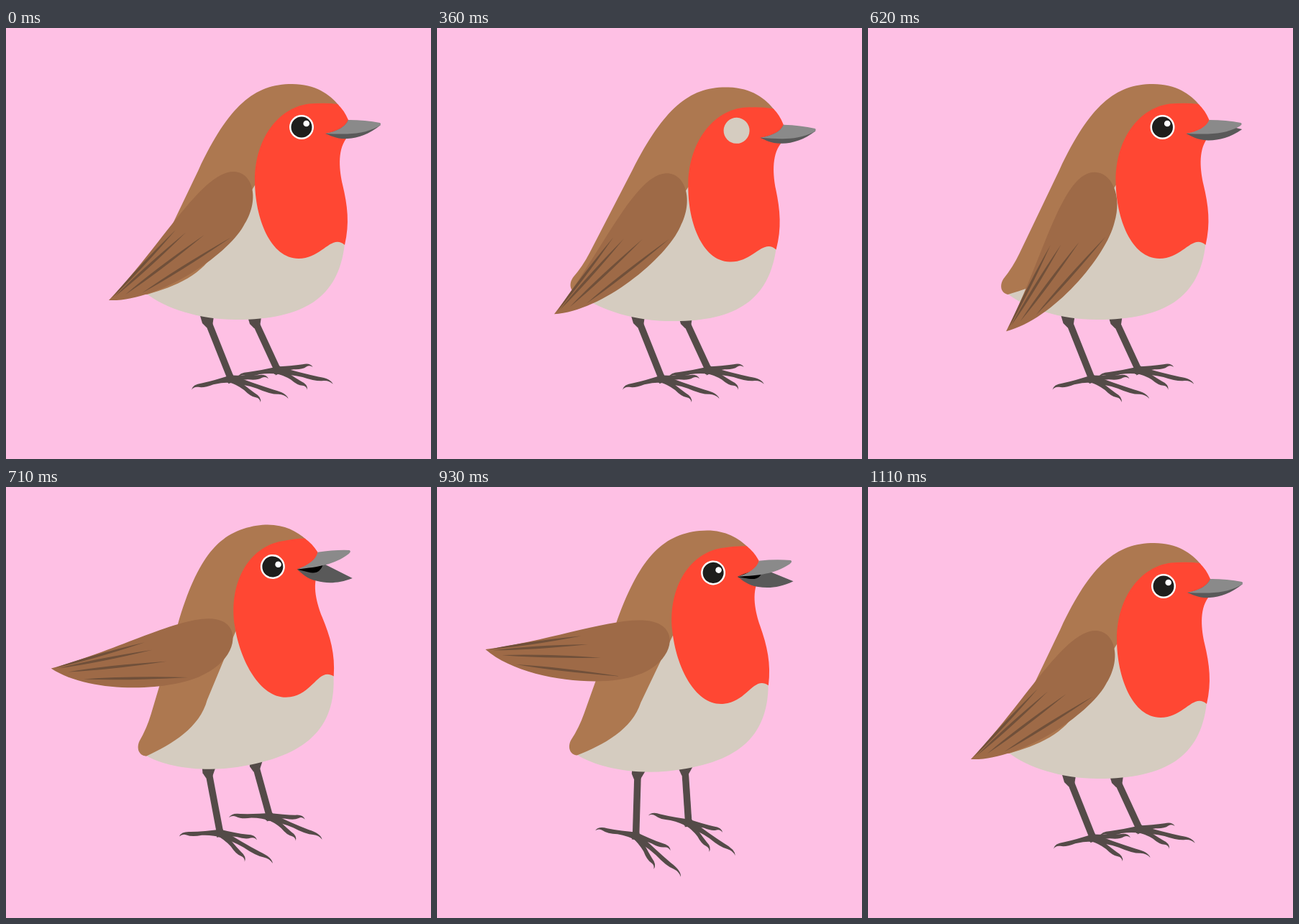
An HTML page with a canvas for the animation above (1.17 s loop, 591 by 600 pixels).

```html
<!DOCTYPE html>
<html lang="en">
<head>
<meta charset="utf-8">
<title>Hopping robin</title>
<style>
html, body { margin: 0; width: 100%; height: 100%; overflow: hidden; background: #fec0e4; }
canvas { display: block; }
</style>
</head>
<body>
<canvas id="stage" width="591" height="600"></canvas>
<script>
const ctx = document.getElementById('stage').getContext('2d');
const LOOP = 1170;
const COLOR = {
  sky: '#fec0e4', back: '#ad7850', wing: '#9e6a47', streak: '#70503a',
  belly: '#d5ccc0', red: '#ff4733', beak: '#8a8a8a', jaw: '#595959',
  leg: '#544b48', pupil: '#1e1e1c'
};

// The picture steps every 30 ms, apart from a few holds
const HOLD = { 0: 200, 260: 100, 420: 170, 770: 100, 1110: 60 };
const TICKS = [];
for (let t = 0; t < LOOP; t += HOLD[t] || 30) TICKS.push(t);

const rest = { turn: 0, x: 0, y: 0, flap: 0, jaw: 0, look: 0, swing: 0 };
const dip = { ...rest, turn: 2.6, flap: -11.5 };
const ready = { ...rest, x: -1.5, flap: -16.3, jaw: 4.5 };
const launch = { turn: -9, x: -9, y: -5, flap: 40, jaw: 27, look: 24, swing: 20 };
const apex = { ...launch, y: -37, flap: 98.5, jaw: 39.5, look: 48, swing: 42 };
const KEYS = [
  [0, rest], [180, rest], [450, dip], [620, ready], [710, launch], [770, apex],
  [870, { ...apex, y: -24 }], [900, { ...launch, flap: 75, swing: 44 }],
  [990, ready], [1050, dip], [1110, rest], [LOOP, rest]
];

const belly = new Path2D(`M471 300 C463 375 415 406 320 406
  C270 406 220 390 196 370 L346 200 400 250Z`);
const back = new Path2D(`M196 371 C186 369 184 358 190 349 Q203 333 212 314
  L268 197 C310 108 345 78 398 78 C430 78 450 92 463 108
  L400 170 346 219 292 307 C276 343 235 360 196 371Z`);
const face = new Path2D(`M461 106 Q470 114 476 128 L473 154
  C460 172 464 200 468 218 C475 247 478 272 471 302
  C452 286 440 321 407 321 C368 321 346 265 346 212
  C346 152 382 105 430 105 Q448 104 461 106Z`);
const beak = new Path2D(`M444 147 C460 144 472 138 476 128 Q500 128 520 132
  Q523 134 518 137 C495 149 475 148 444 147Z`);
const jaw = new Path2D(`M444 147 C460 144 472 138 476 128 L521 135
  C505 148 490 153 475 154 C460 155 452 150 444 147Z`);
const mouth = new Path2D('M444 147 Q457 136 476 128 Q477 145 460 146Z');
const wing = new Path2D(`M143 379 C215 305 272 200 316 200
  C344 200 354 240 330 276 C306 318 210 382 143 379Z`);
const hipBlock = new Path2D('M-12 -9 L10 -9 7 12 -1 14 -7 8Z');

const LEGS = [
  { hip: [346, 404], ankle: [378, 477], tilt: -5, size: 0.94 },
  { hip: [280, 403], ankle: [313, 489], tilt: 0, size: 1 }
];

function fill(path, color) {
  ctx.fillStyle = color;
  ctx.fill(path);
}

function disc(x, y, r, color) {
  ctx.fillStyle = color;
  ctx.beginPath();
  ctx.arc(x, y, r, 0, 7);
  ctx.fill();
}

function rotate(deg) {
  ctx.rotate(deg * Math.PI / 180);
}

function turned(x, y, deg, draw) {
  ctx.save();
  ctx.translate(x, y);
  rotate(deg);
  ctx.translate(-x, -y);
  draw();
  ctx.restore();
}

// Tapering toe with a thin hooked claw
function drawToe([x, y], deg, len) {
  ctx.save();
  ctx.translate(x, y);
  rotate(deg);
  if (deg > 90) ctx.scale(1, -1);
  ctx.beginPath();
  ctx.moveTo(-4, -6);
  ctx.quadraticCurveTo(len * 0.4, -4, len * 0.72, -4.5);
  ctx.quadraticCurveTo(len * 0.94, -6, len, 1);
  ctx.quadraticCurveTo(len * 0.92, -3, len * 0.82, -0.5);
  ctx.quadraticCurveTo(len * 0.7, 3, len * 0.45, 1);
  ctx.quadraticCurveTo(len * 0.2, 1, -4, 6);
  ctx.fill();
  ctx.restore();
}

function drawLeg({ hip: [x, y], ankle, tilt, size }, swing) {
  turned(x + 4, y - 3, swing, () => {
    ctx.strokeStyle = ctx.fillStyle = COLOR.leg;
    ctx.lineWidth = 9.5;
    ctx.beginPath();
    ctx.moveTo(x + 2, y + 8);
    ctx.lineTo(...ankle);
    ctx.stroke();
    drawToe(ankle, 166 - tilt, 57);
    drawToe(ankle, tilt - 2, 52 * size);
    drawToe(ankle, tilt + 18, 84 * size);
    drawToe(ankle, tilt + 37, 52 * size);
    ctx.translate(x, y);
    ctx.fill(hipBlock);
  });
}

function drawWing() {
  fill(wing, COLOR.wing);
  ctx.fillStyle = COLOR.streak;
  for (let i = 0; i < 4; i++) {
    const x0 = 147 + 4.7 * i * i, y0 = 376 - 2.4 * i;
    const x1 = 236 + 8.5 * i + 5.7 * i * i, y1 = 281 + 3.5 * i;
    const mx = x0 * 0.6 + x1 * 0.4, my = y0 * 0.6 + y1 * 0.4;
    ctx.beginPath();
    ctx.moveTo(x0, y0);
    ctx.quadraticCurveTo(mx - 2.5, my - 2.5, x1, y1);
    ctx.quadraticCurveTo(mx + 2.5, my + 2.5, x0, y0);
    ctx.fill();
  }
}

function drawEye(look, closed) {
  const x = 411, y = 138;
  if (closed) return disc(x, y, 18, COLOR.belly);
  disc(x, y, 17, '#fff');
  disc(x, y, 14.5, COLOR.pupil);
  turned(x, y, look, () => disc(x + 6.7, y - 5, 4.3, '#fff'));
}

function poseAt(t) {
  const i = KEYS.findIndex(key => key[0] > t);
  const [t0, a] = KEYS[i - 1], [t1, b] = KEYS[i];
  const k = (t - t0) / (t1 - t0);
  const pose = {};
  for (const part in rest) pose[part] = a[part] + (b[part] - a[part]) * k;
  return pose;
}

function draw(t) {
  const p = poseAt(t);
  ctx.fillStyle = COLOR.sky;
  ctx.fillRect(0, 0, 591, 600);
  ctx.save();
  ctx.translate(p.x, p.y);
  // Feet stay planted while the body dips forward
  turned(255, 325, Math.min(p.turn, 0), () => {
    LEGS.forEach((leg, i) => drawLeg(leg, p.swing * (i ? 1 : 0.92)));
  });
  turned(255, 325, p.turn, () => {
    fill(belly, COLOR.belly);
    fill(back, COLOR.back);
    fill(face, COLOR.red);
    turned(444, 147, p.jaw, () => {
      fill(jaw, COLOR.jaw);
      if (p.jaw > 6) fill(mouth, '#000');
    });
    fill(beak, COLOR.beak);
    drawEye(p.look, t >= 360 && t < 420);
    turned(319, 224, p.flap, drawWing);
  });
  ctx.restore();
}

const start = performance.now();
function frame() {
  const t = (performance.now() - start) % LOOP;
  draw(TICKS.filter(tick => tick <= t).pop());
  requestAnimationFrame(frame);
}
frame();
</script>
</body>
</html>
```
